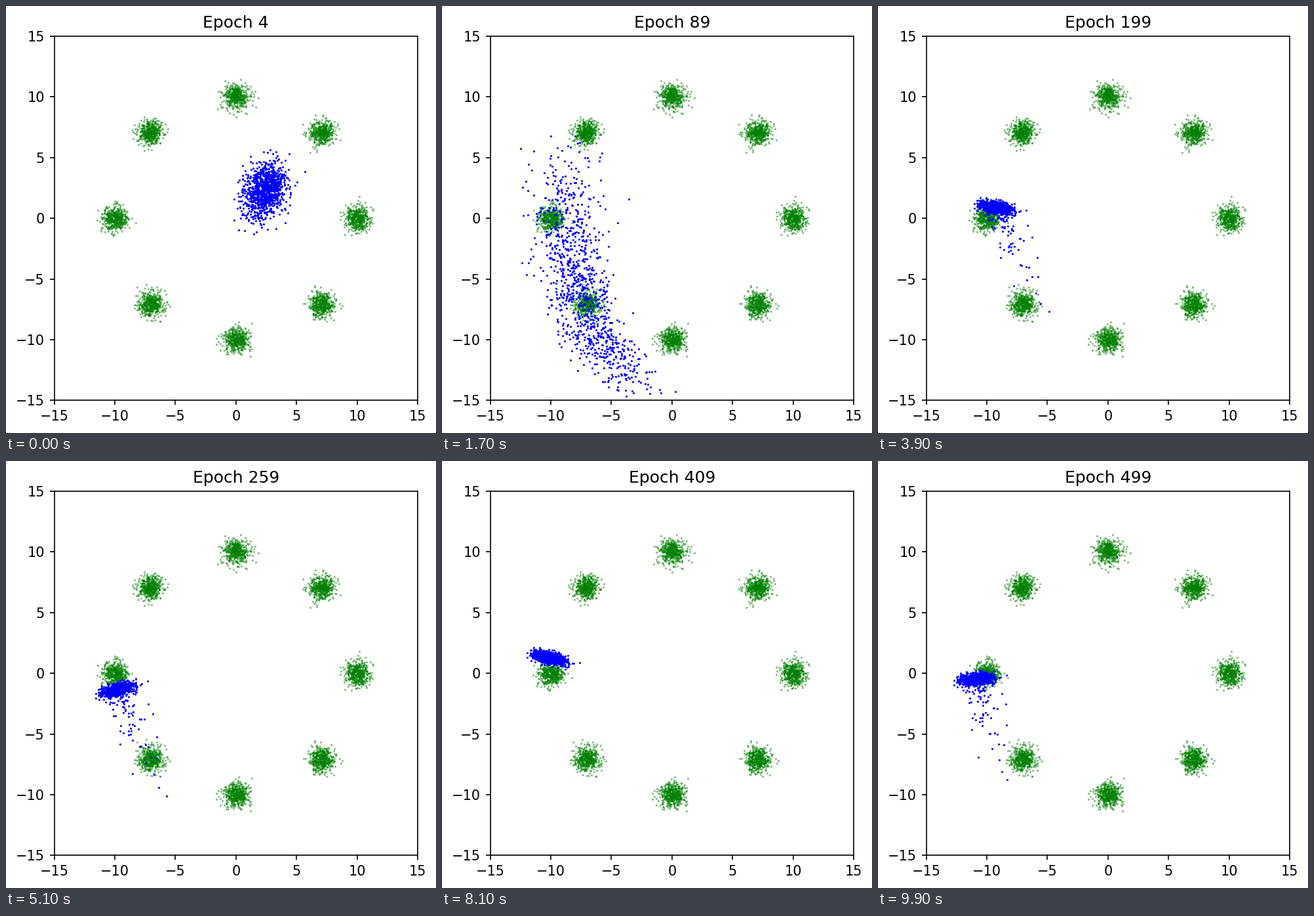
These frames come from a looping animation (656x650 px, 10000 ms). A matplotlib script:

```python
import numpy as np
import matplotlib.pyplot as plt
from matplotlib.animation import FuncAnimation

W, H, DPI = 656, 650, 150
FRAMES, INTERVAL = 100, 100
N, N_TAIL = 1000, 90
SWEEP = 17  # frames until the cloud is stretched along the left side
rng = np.random.default_rng(11)


def smooth(t):
    t = np.clip(t, 0, 1)
    return t * t * (3 - 2 * t)


def bump(i, centre, width):
    return np.exp(-((i - centre) / width) ** 2)


def ring_clusters(count=500, radius=10, sigma=0.5):
    angles = np.repeat(np.arange(8) * np.pi / 4, count)
    centres = radius * np.column_stack([np.cos(angles), np.sin(angles)])
    return centres + rng.normal(0, sigma, centres.shape)


real = ring_clusters()
gx, gy = rng.normal(size=(2, N))
along = -2.6 + 4.5 * rng.beta(2.6, 1.7, N)
reach = np.zeros(N)
reach[:N_TAIL] = -2.2 * np.log(1 - (np.arange(N_TAIL) + 0.5) / (N_TAIL + 1))
sway = rng.normal(0, 0.5, N) * np.minimum(reach, 1)


def sweep(i):
    """Growing cloud that spirals clockwise from the middle to the left."""
    t = min(i / SWEEP, 1)
    angle = np.radians(44 - 192 * smooth(t))
    radius = 3.3 + 6.1 * t
    swell = np.sin(np.pi * t)
    x = radius * np.cos(angle) + (0.87 + 0.5 * t + 3 * swell) * gx
    y = (radius * np.sin(angle) + (1.15 - 0.5 * t + 2.5 * swell) * gy
         + 0.25 * (1 - t) * gx)
    arc = bump(i, SWEEP, 5)
    x = x + 1.2 * arc * (np.exp(0.95 * along) - 1)
    y = y - 5 * arc * along
    return np.column_stack([x, y])


def orbit(i):
    """Flat cloud circling the left cluster, trailing a tail downwards."""
    turn = np.radians(np.interp(i, [SWEEP, 39, 51, 81, 99],
                                [-360, 45, 280, 820, 1280]))
    settle = bump(i, 68, 5)
    radius = 1 - settle
    x = -9.9 + radius * np.cos(turn) + 0.64 * gx
    y = (0.1 * settle + 1.3 * radius * np.sin(turn)
         + (0.24 + 0.24 * settle) * gy - 0.14 * radius * np.sin(turn) * gx)
    tail = 1 - bump(i, 80, 11)
    lean = 0.6 - 0.003 * i
    x = x + tail * (lean * reach + sway)
    y = y - tail * reach
    return np.column_stack([x, y])


def generated(i):
    mix = smooth((i - SWEEP) / 6)
    return (1 - mix) * sweep(i) + mix * orbit(i)


fig = plt.figure(figsize=(W / DPI, H / DPI), dpi=DPI)
ax = fig.add_axes([73.6 / W, 49.6 / H, 554.4 / W, 554.4 / H])
ax.set(xlim=(-15, 15), ylim=(-15, 15),
       xticks=range(-15, 16, 5), yticks=range(-15, 16, 5))
title = ax.set_title("Epoch 4")
ax.scatter(*real.T, s=1, marker=".", c="green", alpha=0.5)
fake = ax.scatter(*generated(0).T, s=1, marker=".", c="blue")


def update(i):
    fake.set_offsets(generated(i))
    title.set_text(f"Epoch {4 + 5 * i}")
    return fake, title


anim = FuncAnimation(fig, update, frames=FRAMES, interval=INTERVAL,
                     repeat=True, repeat_delay=0)
plt.show()
```
